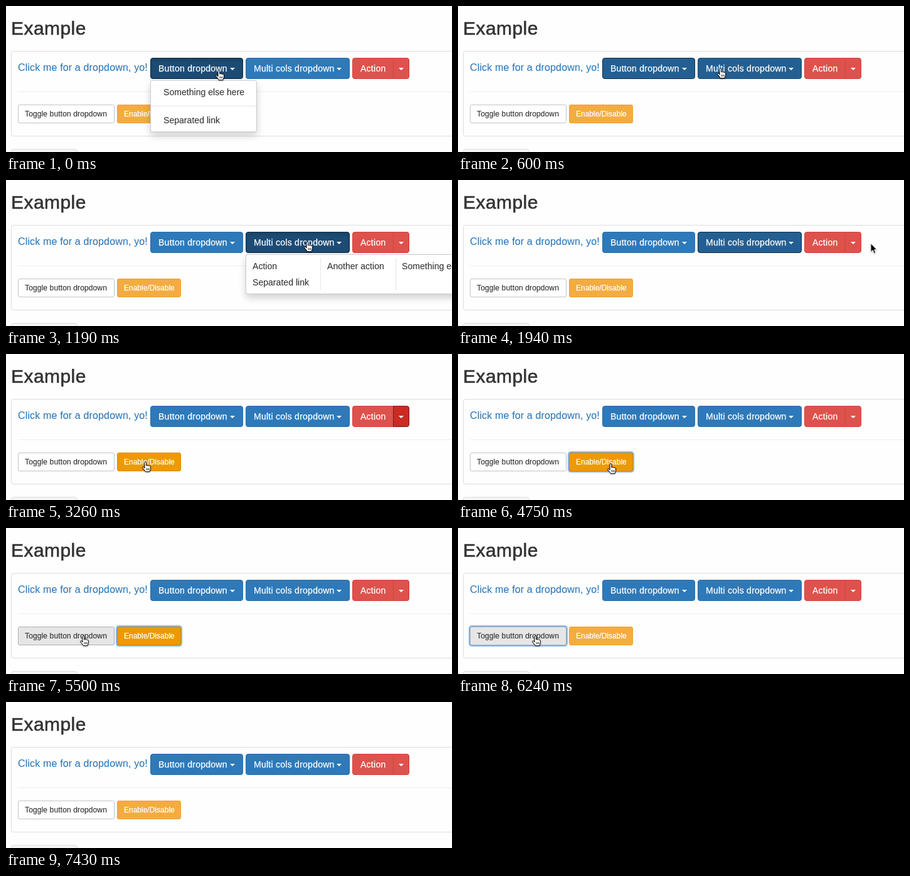
Animation of 711x234 px, one loop 8480 ms. Source, as an HTML page:

```html
<!DOCTYPE html>
<html lang="en">
<head>
<meta charset="utf-8">
<title>Dropdown example</title>
<style>
html, body { margin: 0; width: 100%; height: 100%; overflow: hidden; background: #fefefe; }
body { position: relative; color: #333; font: 14px/20px "Liberation Sans", Arial, sans-serif; white-space: nowrap; cursor: default; }
body * { position: absolute; box-sizing: border-box; }

h2 { left: 8px; top: 19px; margin: 0; font-size: 30px; font-weight: 400; line-height: 33px; letter-spacing: .45px; -webkit-text-stroke: .6px; }
.link { left: 19px; top: 88px; font-size: 16px; line-height: 21px; letter-spacing: .15px; color: #2e79b9; -webkit-text-stroke: .1px; }
.panel { left: 8px; top: 72px; width: 760px; height: 137px; border: 1px solid #ddd; border-radius: 4px; }
.rule { left: 19px; top: 137px; width: 740px; height: 1px; background: #eee; }
.stub { left: 8px; top: 229px; width: 106px; height: 30px; border: 1px solid #ddd; border-radius: 4px; background: #f5f5f5; }

.btn { top: 83px; height: 34px; padding: 6px 12px; border: 1px solid; border-radius: 4px; color: #fff; letter-spacing: .26px; -webkit-text-stroke: .25px; }
.btn i { right: 12px; top: 15px; border: 4px solid transparent; border-top-color: #fff; border-bottom: 0; }
.small { top: 158px; height: 30px; padding: 5px 10px; border-radius: 3px; font-size: 12px; line-height: 18px; }

.blue { background: #2e79b9; border-color: #2a6da8; }
.blue.hover { background: #235f92; border-color: #1f4d76; }
.blue.focus { background: #235f92; border-color: #122b40; }
.blue.open { background: #1c4b74; border-color: #122b40; }
.blue.off { opacity: .65; }
.red { background: #dd524c; border-color: #d6423b; }
.red.hover { background: #cc2a23; border-color: #ad2520; }
.red.focus { background: #cc2a23; border-color: #761c19; }
.red.open { background: #ac2822; border-color: #761c19; }
.orange { background: #f3ac41; border-color: #f0a133; }
.orange.hover, .orange.focus { background: #ee9900; border-color: #d98a06; }
.orange.open { background: #d68500; border-color: #9a6210; }
.plain { background: #fff; border-color: #c4c4c4; color: #333; letter-spacing: .13px; -webkit-text-stroke: .15px; }
.plain.hover { background: #e6e6e6; border-color: #adadad; }
.plain.open { background: #d4d4d4; border-color: #8c8c8c; }
.open { box-shadow: inset 0 3px 5px rgba(0,0,0,.125); }
.ring { box-shadow: 0 0 2px 1.5px #5a9be0; }

#main { left: 230px; width: 148px; }
#multi { left: 382px; width: 166px; }
#act { left: 552px; width: 66px; border-radius: 4px 0 0 4px; }
#split { left: 617px; width: 26px; border-radius: 0 4px 4px 0; }
#split i { right: 8px; }
#toggle { left: 19px; width: 154px; }
#enable { left: 177px; width: 102px; letter-spacing: 0; }

.menu { top: 119px; height: 64px; background: #fff; border: 1px solid rgba(0,0,0,.2); border-radius: 4px; box-shadow: 0 6px 12px rgba(0,0,0,.175); visibility: hidden; }
.menu.shown { visibility: visible; }
.menu span { left: 20px; top: 8px; letter-spacing: .04px; -webkit-text-stroke: .1px; }
.menu hr { margin: 0; border: 0; background: #e5e5e5; }
#mainMenu { left: 230px; width: 170px; height: 83px; }
#mainMenu hr { top: 40px; width: 100%; height: 1px; }
#multiMenu { left: 382px; width: 380px; }
#multiMenu hr { top: 5px; width: 1px; height: 52px; }
#actMenu { left: 552px; width: 160px; }

.cursor { left: 0; top: 0; width: 17px; height: 20px; overflow: visible; visibility: hidden; filter: drop-shadow(0 1px 1px rgba(0,0,0,.3)); }
</style>
</head>
<body>
<h2>Example</h2>
<div class="panel"></div>
<div class="rule"></div>
<div class="stub"></div>
<span class="link">Click me for a dropdown, yo!</span>

<div id="main" class="btn blue">Button dropdown<i></i></div>
<div id="multi" class="btn blue">Multi cols dropdown<i></i></div>
<div id="act" class="btn red">Action</div>
<div id="split" class="btn red"><i></i></div>
<div id="toggle" class="btn small plain">Toggle button dropdown</div>
<div id="enable" class="btn small orange">Enable/Disable</div>

<div id="mainMenu" class="menu">
  <span>Something else here</span><hr><span style="top:53px">Separated link</span>
</div>
<div id="multiMenu" class="menu">
  <span style="left:10px">Action</span><span style="left:10px;top:34px">Separated link</span>
  <hr style="left:118px"><span style="left:129px">Another action</span>
  <hr style="left:238px"><span style="left:248px">Something else here</span>
</div>
<div id="actMenu" class="menu">
  <span>Action</span><span style="top:34px">Another action</span>
</div>

<svg id="hand" class="cursor" viewBox="0 0 17 20">
  <path fill="#fff" stroke="#000" stroke-linejoin="round" d="M5 11V2.2a1.4 1.4 0 0 1 2.8 0V7c.2-1.2 2.4-1.1 2.5.3.3-1 2.2-.8 2.3.5.5-.8 1.9-.4 1.9.8v3.2c0 1.5-1.2 2.6-1.4 4.9H6.2c-.3-1.8-2.5-3.6-4.4-6.2-.8-1.2.6-2.2 1.8-1.2z"/>
  <path stroke="#000" stroke-width=".8" d="M8 11v3.2M10 11v3.2M12 11v3.2"/>
</svg>
<svg id="arrow" class="cursor" viewBox="0 0 17 20">
  <path stroke="#fff" d="M1 .6V14.5L4.2 11.5 6.3 16.6 8.7 15.6 6.6 10.7H10.9z"/>
</svg>

<script>
const LOOP = 8480;
const $ = id => document.getElementById(id);
const buttons = ['main', 'multi', 'act', 'split', 'toggle', 'enable'];
const menus = ['main', 'multi', 'act'];
const base = Object.fromEntries(buttons.map(id => [id, $(id).className]));
const hand = (x, y) => ({ cursor: 'hand', x, y });
const arrow = (x, y) => ({ cursor: 'arrow', x, y });

// Each step lists only what changes at that time.
const steps = [
  [0, { ...hand(333, 102), main: 'open', menu: 'main' }],
  [150, { main: 'focus', menu: '' }],
  [450, hand(358, 101)],
  [600, { ...hand(412, 99), multi: 'hover' }],
  [750, { ...hand(449, 98), main: '', multi: 'open' }],
  [890, { menu: 'multi' }],
  [1190, hand(474, 98)],
  [1640, { multi: 'focus', menu: '' }],
  [1790, { ...hand(585, 99), act: 'hover' }],
  [1940, { ...arrow(657, 101), act: '' }],
  [2230, { ...hand(622, 100), split: 'hover' }],
  [2380, { multi: '', split: 'open' }],
  [2530, { menu: 'act' }],
  [2670, hand(623, 101)],
  [2820, { split: 'focus', menu: '' }],
  [2970, arrow(560, 125)],
  [3110, arrow(340, 162)],
  [3260, { ...hand(216, 172), enable: 'hover' }],
  [3410, hand(228, 174)],
  [3560, hand(236, 174)],
  [3700, { split: '', enable: 'open ring' }],
  [3850, { main: 'off', enable: 'hover ring' }],
  [4000, hand(237, 175)],
  [4150, { enable: 'open ring' }],
  [4300, { enable: 'hover ring' }],
  [4750, { main: '' }],
  [5050, hand(205, 174)],
  [5200, { ...hand(160, 173), toggle: 'hover', enable: 'focus ring' }],
  [5350, hand(130, 172)],
  [5500, hand(117, 172)],
  [5640, { toggle: 'open ring', enable: '' }],
  [5790, { main: 'open', menu: 'main', toggle: 'hover ring' }],
  [6090, { toggle: 'open ring' }],
  [6240, { main: '', menu: '', toggle: 'hover ring' }],
  [6390, hand(81, 173)],
  [6690, arrow(270, 200)],
  [6830, arrow(560, 217)],
  [6980, { cursor: '' }],
  [7430, { toggle: '' }]
];

function render(time) {
  const state = {};
  for (const [at, change] of steps) if (at <= time) Object.assign(state, change);
  for (const id of buttons) $(id).className = `${base[id]} ${state[id] || ''}`;
  for (const id of menus) $(id + 'Menu').classList.toggle('shown', state.menu === id);
  for (const id of ['hand', 'arrow']) {
    const style = $(id).style;
    style.visibility = state.cursor === id ? 'visible' : 'hidden';
    style.left = state.x + 'px';
    style.top = state.y + 'px';
  }
}

const start = performance.now();
function tick() {
  render((performance.now() - start) % LOOP);
  requestAnimationFrame(tick);
}
tick();
</script>
</body>
</html>
```
